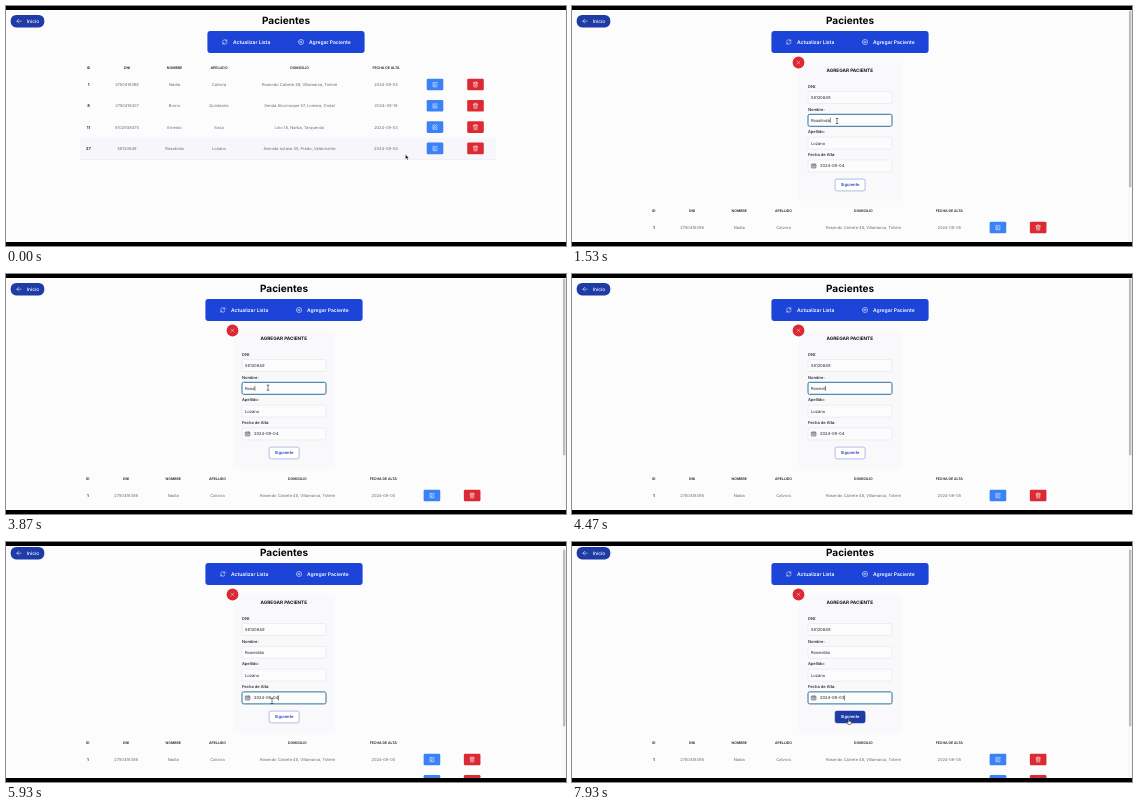
An HTML page for the animation above (8 s loop, 560 by 240 pixels).

```html
<!DOCTYPE html>
<html lang="es">
<head>
<meta charset="utf-8">
<title>Pacientes</title>
<style>
  html, body { margin: 0; width: 100%; height: 100%; overflow: hidden; background: #fcfcfd; }
  svg { display: block; width: 560px; height: 240px; }
  text { font-family: Inter, "Open Sans", sans-serif; text-rendering: geometricPrecision; white-space: pre; }
  .line { fill: none; stroke-linecap: round; stroke-linejoin: round; }
</style>
</head>
<body>
<svg id="stage" viewBox="0 0 560 240"></svg>
<script>
const LOOP = 8000;
const OPEN = 640, FOCUS = 1450, DRAG = [2050, 2680], CUT = 3400;
const BACK = 3950, TYPE = 4080, KEY = 100, PICKER = 5950, PICK = 6920;
const BEFORE = 'Rosalinda', AFTER = 'Rosenilda';
const INK = '#15181f', BLUE = '#1c44d9', NAVY = '#1e3ba6', RED = '#dc2a35';

// Markup helpers; text is placed by its visual centre line.
const rect = (x, y, w, h, r, fill, extra = '') =>
  `<rect x="${x}" y="${y}" width="${w}" height="${h}" rx="${r}" fill="${fill}" ${extra}/>`;
const text = (s, x, y, size, weight = 400, fill = INK, anchor = 'start', id = '') =>
  `<text ${id && `id="${id}"`} x="${x}" y="${y + size * .36}" font-size="${size}" font-weight="${weight}" fill="${fill}" text-anchor="${anchor}">${s}</text>`;
const mid = (s, x, y, size, weight, fill) => text(s, x, y, size, weight, fill, 'middle');
const icon = (d, x, y, size, color = '#fff', width = 2) =>
  `<path class="line" d="${d}" stroke="${color}" stroke-width="${width}" transform="translate(${x - size / 2} ${y - size / 2}) scale(${size / 24})"/>`;
const group = (id, body) => `<g id="${id}">${body}</g>`;

const ICONS = {
  left: 'M20 12H4M11 5L4 12L11 19',
  right: 'M4 12H20M13 5L20 12L13 19',
  refresh: 'M3 10A9 9 0 0 1 20 8M20 3V8H15M21 14A9 9 0 0 1 4 16M4 21V16H9',
  plus: 'M2 12a10 10 0 1 0 20 0a10 10 0 1 0 -20 0M12 8V16M8 12H16',
  edit: 'M11 4H4V21H20V14M9 15V11L18 2L22 6L13 15Z',
  trash: 'M3 6H21M8 6V2H16V6M5 6L6 22H18L19 6M10 11V17M14 11V17',
  close: 'M5 5L19 19M19 5L5 19',
  date: 'M3 5H21V21H3ZM3 9H21M8 2V6M16 2V6M7 13H17M7 17H17'
};

const HEADS = ['ID', 'DNI', 'NOMBRE', 'APELLIDO', 'DOMICILIO', 'FECHA DE ALTA'];
const COLS = [82.5, 121, 168.5, 213, 293.5, 380];
const ROWS = [
  ['1', '2750416398', 'Nadia', 'Calvora', 'Rosendo Calvete 48, Villamarca, Tolimé', '2024-09-05'],
  ['8', '2750416407', 'Bruno', 'Quintarelo', 'Senda Alcornoque 57, Lomera, Ondal', '2024-09-18'],
  ['11', '6102938475', 'Ernesto', 'Sosa', 'Lirio 18, Narba, Tarquendo', '2024-09-03'],
  ['27', '58120649', BEFORE, 'Lozano', 'Avenida octava 35, Prado, Valdoriente', '2024-09-04']
];

function header(w) {
  const c = w / 2;
  return rect(4.7, 9, 33.6, 12.4, 5.4, NAVY) + icon(ICONS.left, 13, 15.2, 6.4) +
    text('Inicio', 20.8, 15.2, 4.85, 500, '#fff') +
    mid('Pacientes', c, 14.6, 10, 700, '#050505') +
    rect(c - 78.6, 25, 157.2, 22, 3, BLUE) +
    icon(ICONS.refresh, c - 61.2, 36, 6) +
    text('Actualizar Lista', c - 53, 36, 5, 600, '#fff') +
    icon(ICONS.plus, c + 15, 36, 6.2) +
    text('Agregar Paciente', c + 23, 36, 5, 600, '#fff');
}

function table(w, dy) {
  const k = w / 560;
  let out = HEADS.map((h, i) => mid(h, COLS[i] * k, 62 + dy, 3.5, 700, '#30343c')).join('');
  ROWS.forEach((row, r) => {
    const y = 78.5 + 21.3 * r + dy;
    out += row.map((s, i) =>
      mid(s, COLS[i] * k, y, 4.02, i ? 400 : 600, i ? '#666b76' : INK)).join('');
    [[429, '#3b82f6', ICONS.edit], [469.5, RED, ICONS.trash]].forEach(([x, fill, d]) => {
      out += rect(x * k - 8.3, y - 5.8, 16.6, 11.6, 1.3, fill) + icon(d, x * k, y, 6);
    });
  });
  return out;
}

function form() {
  const labels = ['DNI:', 'Nombre:', 'Apellido:', 'Fecha de Alta:'];
  const values = ['58120649', BEFORE, 'Lozano', '2024-09-04'];
  let out = rect(227, 57, 102, 138, 2, '#f9f9fb') +
    `<circle cx="226.5" cy="56.5" r="5.9" fill="${RED}"/>` + icon(ICONS.close, 226.5, 56.5, 5) +
    mid('AGREGAR PACIENTE', 277.8, 64.7, 4.65, 700, '#101216');
  labels.forEach((s, i) => {
    const y = 91.5 + 22.8 * i;
    out += text(s, 236, y - 11.2, 4.05, 500) +
      rect(236, y - 6, 84, 12, 1.6, '#fcfcfd', `id="box${i}"`) +
      (i === 1 ? rect(239, y - 3, 0, 6, 0, '#aec8e4', 'id="mark"') : '') +
      (i === 3 ? icon(ICONS.date, 241.8, y, 5.6, '#4b5563', 2.4) : '') +
      text(values[i], i === 3 ? 248 : 239, y, 4.1, 400, '#20242c', 'start', 'val' + i);
  });
  return out + rect(0, 0, .5, 5, 0, '#111', 'id="caret"') +
    rect(263.1, 173.1, 30, 11.8, 1.8, '#fff', 'id="next" stroke-width=".6"') +
    text('Siguiente', 278.1, 179, 4.15, 600, NAVY, 'middle', 'nextText');
}

function calendar() {
  const x = i => 247 + 10.65 * i;
  let out = rect(236, 169, 86, 80, 2, '#39424f') +
    icon(ICONS.left, 246, 179.3, 5.6, '#fff', 2.6) + icon(ICONS.right, 312, 179.3, 5.6, '#fff', 2.6) +
    mid('September 2024', 279, 179.4, 4.1, 600, '#fff') +
    rect(273.6, 196.8, 10.6, 10.4, 1.6, '#2563eb');
  'Su Mo Tu We Th Fr Sa'.split(' ').forEach((d, i) => { out += mid(d, x(i), 192, 3.6, 500, '#a0a7b3'); });
  for (let d = 0; d < 30; d++)
    out += mid(d + 1, x(d % 7), 202 + 10.5 * Math.floor(d / 7), 3.9, 600, '#fff');
  return out;
}

const stage = document.getElementById('stage');
stage.innerHTML = rect(0, 0, 560, 240, 0, '#fcfcfd') +
  group('list', rect(74, 132, 416, 21.3, 0, '#f7f7fb', 'id="hover"') +
    rect(74, 153, 416, .5, 0, '#e3e4ea', 'id="rule"') + header(560) + table(560, 0)) +
  group('page', header(556) + form() + table(556, 143) + group('picker', calendar())) +
  group('bar', rect(556, 4, 4, 232, 0, '#f8f8f9') + rect(557, 4.5, 2.4, 177, 1.2, '#bcbec2', 'id="thumb"')) +
  group('arrow', '<path d="M0 0V4.6L1.1 3.7L1.9 5.4L2.7 5L1.9 3.4H3.3Z" fill="#111" stroke="#fff" stroke-width=".3"/>') +
  group('beam', '<path class="line" d="M-.9 -2.5H.9M0 -2.5V2.5M-.9 2.5H.9" stroke="#222" stroke-width=".55"/>') +
  group('hand', '<path d="M-.5 0Q0 -.6 .5 0V2L2.4 2.5Q2.9 2.7 2.6 4L2 5.4H-.7L-2 3.2Q-1.6 2.6 -.5 3.4Z" fill="#fff" stroke="#111" stroke-width=".55"/>') +
  rect(0, 0, 560, 4, 0, '#000') + rect(0, 236, 560, 4, 0, '#000');

const $ = id => document.getElementById(id);
const set = (id, attrs) => { for (const k in attrs) $(id).setAttribute(k, attrs[k]); };
const show = (id, on) => set(id, { display: on ? 'inline' : 'none' });
const clamp = v => Math.max(0, Math.min(1, v));
const ease = v => { v = clamp(v); return v * v * (3 - 2 * v); };

// Pointer path: time, x, y
const PATH = [
  [0, 399.5, 148.5], [430, 428, 143], [800, 428, 143], [1380, 265, 115], [1750, 265, 115],
  [2030, 259, 114.5], [2680, 248.5, 114.5], [3300, 249, 114.5], [3750, 262, 113.7],
  [5300, 262, 113.7], [5850, 266, 159], [6050, 266, 159], [6550, 280, 199],
  [6740, 280, 199], [6890, 268.5, 199], [7150, 268.5, 199], [7680, 276.7, 177], [LOOP, 276.7, 177]
];

function pointer(t) {
  const i = Math.max(1, PATH.findIndex(p => p[0] > t));
  const [a, b] = [PATH[i - 1], PATH[i]], k = ease((t - a[0]) / (b[0] - a[0]));
  return [a[1] + (b[1] - a[1]) * k, a[2] + (b[2] - a[2]) * k];
}

function nameAt(t) {
  if (t < CUT) return BEFORE;
  if (t < BACK) return BEFORE.slice(0, 4);
  return AFTER.slice(0, 3 + Math.max(0, Math.min(6, Math.floor((t - TYPE) / KEY) + 1)));
}

const width = (id, n) => n > 0 ? $(id).getSubStringLength(0, n) : 0;

function render(t) {
  const opened = t >= OPEN, scroll = 4 * ease((t - 5780) / 120);
  const picking = t >= PICKER && t < PICK;
  const [x, y] = pointer(t);
  show('list', !opened);
  show('page', opened);
  show('bar', opened);
  show('picker', picking);
  set('page', { transform: `translate(0 ${-scroll})` });
  set('thumb', { y: 4.5 + scroll * .76 });

  const focus = t >= PICKER - 50 ? 3 : t >= FOCUS ? 1 : -1;
  for (let i = 0; i < 4; i++)
    set('box' + i, { stroke: i === focus ? '#2c7199' : '#dfe1e6', 'stroke-width': i === focus ? 1 : .5 });

  const over = t > 7600;
  set('next', { fill: over ? NAVY : '#fff', stroke: over ? NAVY : '#7f93d2' });
  set('nextText', { fill: over ? '#fff' : '#2348bd' });

  if (opened) {
    const name = nameAt(t);
    $('val1').textContent = name;
    $('val3').textContent = t < PICK ? '2024-09-04' : '2024-09-03';
    const picked = t >= DRAG[0] && t < CUT
      ? Math.round(5 * clamp((t - DRAG[0]) / (DRAG[1] - DRAG[0]))) : 0;
    const from = width('val1', name.length - picked);
    set('mark', { x: 239 + from, width: picked ? width('val1', name.length) - from : 0 });

    const lastKey = Math.min(t, TYPE + 5 * KEY);
    const since = t - (t >= PICK ? PICK : t >= PICKER ? PICKER : t >= BACK ? lastKey : t >= CUT ? CUT : FOCUS);
    show('caret', focus > 0 && !picked && since % 1000 < 500);
    set('caret', focus === 3
      ? { x: 248.2 + width('val3', 10), y: 157.4 }
      : { x: 239.2 + width('val1', name.length), y: 111.8 });
  }

  const typing = t > BACK && t < 5300;
  const inField = opened && x > 236 && x < 320 && (y > 108 && y < 121 || y > 150 && y < 166) && !picking;
  const kind = typing ? '' : inField ? 'beam'
    : (!opened && x > 420) || (picking && y > 193) || over ? 'hand' : 'arrow';
  ['arrow', 'beam', 'hand'].forEach(id => {
    show(id, id === kind);
    set(id, { transform: `translate(${x} ${y})` });
  });
}

function tick(now) {
  render(now % LOOP);
  requestAnimationFrame(tick);
}
render(0);
requestAnimationFrame(tick);
</script>
</body>
</html>
```
